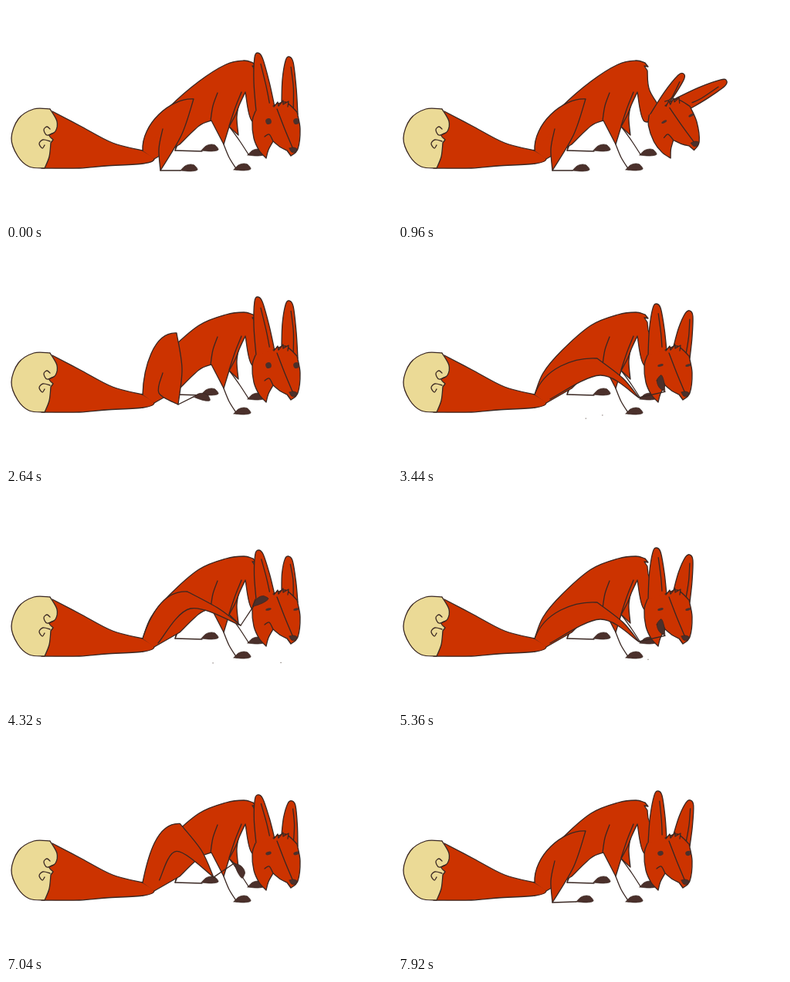
Write an HTML page that moves like this. It is 500x281 px and loops after 8 s.

```html
<!DOCTYPE html>
<html lang="en">
<head>
<meta charset="utf-8">
<title>Fox scratching</title>
<style>
html, body { margin: 0; width: 100%; height: 100%; overflow: hidden; background: #fff; }
svg { display: block; width: 100vw; height: 100vh; }
path { stroke: #392722; stroke-width: 1.3; stroke-linejoin: round; stroke-linecap: round; }
.red { fill: #cc3300; }
.cream { fill: #ebda96; }
.dark { fill: #4b302b; stroke-width: .7; }
.line { fill: none; }
</style>
</head>
<body>
<svg id="stage" viewBox="0 0 500 281"></svg>
<script>
const LOOP = 8000, STEP = 80;
const stage = document.getElementById('stage');

// Joints of the near hind leg, ear tips, and how far the eyes are open.
const stand = { knee: [243, 121], ankle: [200, 214], paw: [237, 211], turn: [0], earL: [326, 61], earR: [367, 66], lids: [4] };
const wince = { ...stand, earL: [352, 84], earR: [397, 112], lids: [.8] };
const lift = { ...stand, knee: [221, 108], ankle: [223, 201], paw: [254, 191], turn: [15] };
const scratch = { knee: [235, 127], ankle: [304, 171], paw: [329, 139], turn: [-25], earL: [327, 73], earR: [366, 81], lids: [1.5] };
const push = { knee: [258, 141], ankle: [312, 192], paw: [341, 174], turn: [-100], earL: [335, 70], earR: [378, 79], lids: [1.6] };
const pull = { knee: [221, 109], ankle: [286, 173], paw: [318, 162], turn: [80], earL: [324, 75], earR: [368, 82], lids: [2] };
const rest = { ...stand, paw: [242, 210], earL: [337, 69], earR: [379, 81], lids: [3] };

const clamp = v => Math.min(1, Math.max(0, v));
const lerp = (a, b, k) => a.map((v, i) => v + (b[i] - v) * k);
const shift = ([x, y], dx, dy) => [x + dx, y + dy];

function ramp(t, from, to) {
  const u = clamp((t - from) / (to - from));
  return u * u * (3 - 2 * u);
}

function blend(a, b, k) {
  const out = {};
  for (const name in a) out[name] = lerp(a[name], b[name], k);
  return out;
}

// Smooth curve through each run of points; runs meet in corners.
function curve(...runs) {
  let d = 'M' + runs[0][0], last = null;
  for (const run of runs) {
    const p = last ? [last, ...run] : run;
    for (let i = 0; i < p.length - 1; i++) {
      const p0 = p[i - 1] || p[i], p1 = p[i], p2 = p[i + 1], p3 = p[i + 2] || p2;
      const c1 = p1.map((v, j) => v + (p2[j] - p0[j]) / 6);
      const c2 = p2.map((v, j) => v - (p3[j] - p1[j]) / 6);
      d += `C${c1} ${c2} ${p2}`;
    }
    last = p[p.length - 1];
  }
  return d;
}

// The same from text, with "|" at the corners.
const trace = text => curve(...text.split('|').map(run => run.split(' ').map(p => p.split(',').map(Number))));

function add(cls, d = '', parent = stage, tag = 'path') {
  const el = document.createElementNS('http://www.w3.org/2000/svg', tag);
  el.setAttribute('class', cls);
  if (d) el.setAttribute('d', d);
  parent.append(el);
  return el;
}
const shape = (el, d) => el.setAttribute('d', d);
const place = (el, [x, y], turn = 0) => el.setAttribute('transform', `translate(${x} ${y}) rotate(${turn})`);

function addPaw(x, y) {
  const el = add('dark', trace('-11,3 -5,-3 2,-5 7,-4|11,2 2,4 -11,3'));
  place(el, [x, y]);
  return el;
}

// Far legs
add('red', trace('302,125 299,145 301,168|288,156'));
add('line', trace('290,158 303,176 314,193'));
addPaw(324, 191);
add('red', trace('246,156 228,170 219,188|222,180 240,150'));
add('line', 'M219,188 254,189');
addPaw(264, 185);

// Tail
add('red', trace('60,137 98,157 138,178 177,188|192,199 178,205 130,208 95,211 46,211'));
add('cream', trace('57,134 36,134 16,147 7,172 15,195 30,209 50,211|56,196 58,178|61,174|56,168 64,163 66,150 57,134'));
add('line', trace('62,165 53,168 49,161 53,157 57,160'));
add('line', trace('57,176 48,174 43,179 47,185 50,181'));

const body = add('red');
add('line', trace('274,113 268,130 265,149'));
add('line', trace('305,112 297,132 289,156'));
add('line', trace('282,180 289,197 299,213'));
addPaw(306, 210);
const thigh = add('red');

// Head, turning about the brow
const head = add('', '', stage, 'g');
const ears = [
  { name: 'earL', left: [324, 137], right: [348, 131] },
  { name: 'earR', left: [357, 125], right: [378, 141] }
];
for (const ear of ears) {
  ear.skin = add('red', '', head);
  ear.crease = add('line', '', head);
}
add('red', trace('323,137 319,150 321,172 328,188 337,198|340,187 346,176|356,184 364,188|369,195|378,186 381,160 377,138|362,125 346,130'), head);
add('red', 'M347,131 352,125 353,130 359,123 359,128 366,124 365,131', head);
add('line', trace('351,134 361,160 371,184'), head);
add('line', trace('335,170 341,167 346,176'), head);
const eyes = [[340, 150], [376, 150]].map(at => {
  const el = add('dark', '', head, 'ellipse');
  el.setAttribute('rx', 3.8);
  place(el, at, -15);
  return el;
});
add('dark', trace('367,185 372,184 377,186 375,190 370,190 367,185'), head);

const shin = add('line');
const paw = addPaw(0, 0);
const dust = add('dark');

function drawBody(drop) {
  const y = drop * 10;
  shape(body, curve(
    [[177, 188], [188, 160], [212, 131], [250, 98], [285, 76 + y * .8], [308, 71 + y], [320, 74 + y]],
    [[324, 79 + y]], [[319, 78 + y]], [[323, 84 + y]],
    [[326, 110], [345, 140]],
    [[319, 150], [310, 112]],
    [[303, 127], [297, 142], [289, 157]],
    [[282, 180]], [[266, 149]],
    [[250, 156], [225, 180]], [[192, 199]]
  ));
}

function drawLeg({ knee, ankle, paw: at, turn: [turn] }) {
  const rump = [177, 188], reach = clamp((ankle[0] - 225) / 60);
  const c1 = shift(rump, (ankle[0] - 215) / 8, -34), c2 = shift(knee, -30, -2);
  const front = shift(lerp(knee, ankle, .5), 6, 0);
  const pit = lerp([198, 186], shift(knee, 4, 22), reach);
  const under = lerp([203, 160], [197, 194], reach);
  shape(thigh, `M${rump}C${c1} ${c2} ${knee}` + curve([knee, front, ankle], [pit, under]).replace(/^M[^C]*/, ''));

  const a = turn * Math.PI / 180, cos = Math.cos(a), sin = Math.sin(a);
  shape(shin, `M${ankle}L${shift(at, -11 * cos - 3 * sin, -11 * sin + 3 * cos)}`);
  place(paw, at, turn);
}

function drawEar({ name, left, right, skin, crease }, pose) {
  const tip = pose[name], mid = lerp(left, right, .5);
  const length = Math.hypot(tip[0] - mid[0], tip[1] - mid[1]);
  const nx = (mid[1] - tip[1]) / length, ny = (tip[0] - mid[0]) / length;
  const side = (base, k, out) => shift(lerp(base, tip, k), nx * out, ny * out);
  shape(skin, curve([left, side(left, .5, -4), side(left, .92, -4), tip, side(right, .9, 4), side(right, .45, 3), right]));
  shape(crease, curve([side(mid, .8, 2), side(mid, .4, 5), side(right, .08, -5)]));
}

// A few specks of dirt thrown up on each step.
function drawDust(t) {
  const rnd = n => Math.abs(Math.sin(t / STEP * 12.9 + n * 78.2) * 43758.5) % 1;
  let d = '';
  if (t > 3200 && t < 7000) {
    for (let i = 0; i < 2; i++) d += `M${240 + rnd(i) * 120},${204 + rnd(i + 5) * 18}h.6`;
  }
  shape(dust, d);
}

function draw(t) {
  // Shaking the head: the ears trail a quarter turn behind.
  const shaking = ramp(t, 320, 720) * (1 - ramp(t, 1920, 2320));
  const phase = (t - 1840) / 480 * Math.PI * 2;
  const nod = shaking * (.5 + .5 * Math.cos(phase));
  const fling = shaking * 48 * Math.abs(Math.sin(phase));

  // Scratching: the paw swings either side of the middle pose.
  const swing = Math.sin((t - 4320) / 480 * Math.PI * 2) / Math.sin(Math.PI / 3);
  const stroke = blend(scratch, swing > 0 ? push : pull, Math.abs(swing));

  const settle = ramp(t, 2320, 2640);
  let pose = blend(stand, wince, nod);
  pose = blend(pose, lift, settle);
  pose = blend(pose, stroke, ramp(t, 2720, 3200));
  pose = blend(pose, rest, ramp(t, 6880, 7440));
  pose.earL = shift(pose.earL, fling * .8, fling * .4);
  pose.earR = shift(pose.earR, fling, fling * .4);

  drawBody(settle);
  drawLeg(pose);
  for (const ear of ears) drawEar(ear, pose);
  for (const eye of eyes) eye.setAttribute('ry', pose.lids[0]);
  head.setAttribute('transform', `rotate(${-18 * nod} 345 130)`);
  drawDust(t);
}

const start = performance.now();
function tick() {
  const t = (performance.now() - start) % LOOP;
  draw(Math.floor(t / STEP) * STEP);
  requestAnimationFrame(tick);
}
draw(0);
tick();
</script>
</body>
</html>
```
